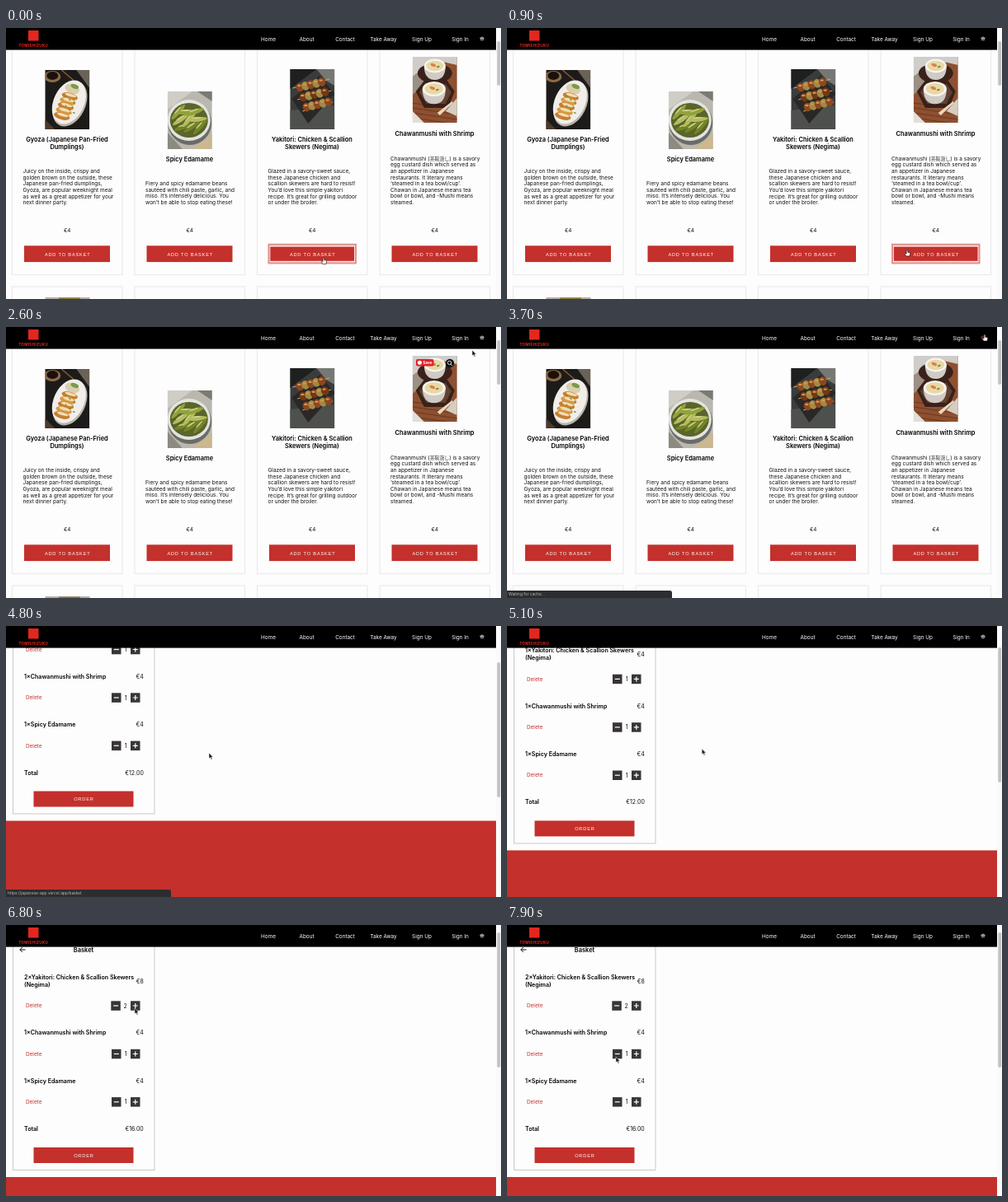
These frames come from a looping animation (600x329 px, 8 s). An HTML page:

```html
<!DOCTYPE html>
<html lang="en">
<head>
<meta charset="utf-8">
<title>Restaurant basket</title>
<style>
html, body { margin: 0; width: 100%; height: 100%; overflow: hidden; background: #fdfdfd; }
svg { display: block; }
#stage { width: 100vw; height: 100vh; }
text { font: 400 6.4px Inter, "Noto Sans CJK JP", "Noto Sans CJK", sans-serif; fill: #111; white-space: pre; }
.nav { fill: #fff; }
.body { font-size: 6.5px; }
.jp { font-size: 5.9px; font-weight: 300; fill: #333; }
.title { font-size: 7.45px; font-weight: 600; fill: #000; }
.item { font-size: 7.1px; font-weight: 600; fill: #000; }
.sum { font-size: 7px; }
.del { fill: #c4302b; }
.btn { font: 400 5.6px "Liberation Sans", Arial, sans-serif; letter-spacing: .85px; fill: #fff; }
.brand { font-size: 4.6px; font-weight: 700; letter-spacing: .3px; fill: #e3271f; }
.stat { font-size: 4.8px; fill: #b9b9b9; }
.save { font-size: 4.8px; font-weight: 700; fill: #fff; }

.on { animation: 8s step-end infinite; }
#shop { animation-name: shop; }
#cart { animation-name: cart; }
#ring2 { animation-name: ring2; }
#ring3 { animation-name: ring3; }
#save { animation-name: save; }
#hot { animation-name: hot; }
#url { animation-name: url; }
#wait { animation-name: wait; }
.one { animation-name: one; }
.two { animation-name: two; }
#hand { animation-name: hand; }
#arrow { animation-name: arrow; }
#page { animation: scroll 8s infinite; }
#thumb { animation: thumb 8s infinite; }
#cursor { animation: cursor 8s infinite; }

@keyframes shop { 0% { visibility: visible } 47.5%, 100% { visibility: hidden } }
@keyframes cart { 0% { visibility: hidden } 47.5%, 100% { visibility: visible } }
@keyframes ring2 { 0% { visibility: visible } 6.5%, 100% { visibility: hidden } }
@keyframes ring3 { 0%, 23.75%, 100% { visibility: hidden } 8.6% { visibility: visible } }
@keyframes save { 0%, 35%, 100% { visibility: hidden } 27.25% { visibility: visible } }
@keyframes hot { 0%, 50%, 100% { visibility: hidden } 35.6% { visibility: visible } }
@keyframes url { 0%, 43.75%, 62.5%, 100% { visibility: hidden } 38.75%, 47.5% { visibility: visible } }
@keyframes wait { 0%, 47.5%, 100% { visibility: hidden } 43.75% { visibility: visible } }
@keyframes one { 0% { visibility: inherit } 82.5%, 100% { visibility: hidden } }
@keyframes two { 0% { visibility: hidden } 82.5%, 100% { visibility: inherit } }
@keyframes hand { 0%, 8.6%, 35.6% { visibility: visible } 6.5%, 23.75%, 50%, 100% { visibility: hidden } }
@keyframes arrow { 0%, 8.6%, 35.6% { visibility: hidden } 6.5%, 23.75%, 50%, 100% { visibility: visible } }
@keyframes scroll { 0%, 61.5% { transform: translateY(-69.5px) } 69%, 100% { transform: none } }
@keyframes thumb { 0%, 61.5% { transform: translateY(35px) } 69%, 100% { transform: none } }
@keyframes cursor {
  0%, 4.5% { transform: translate(385px, 278.5px) }
  9.5% { transform: translate(489px, 272px) }
  11.25%, 18% { transform: translate(485px, 269px); animation-timing-function: ease-in }
  25% { transform: translate(503px, 205px); animation-timing-function: linear }
  28.5% { transform: translate(525px, 100px); animation-timing-function: ease-out }
  32.5% { transform: translate(565px, 28px) }
  37%, 49% { transform: translate(579px, 9px) }
  57% { transform: translate(256px, 149px) }
  60%, 63% { transform: translate(246px, 154px) }
  70%, 72.5% { transform: translate(156px, 107px) }
  76.25%, 90% { transform: translate(156px, 101px); animation-timing-function: ease-in }
  95% { transform: translate(148px, 205px) }
  98.5%, 100% { transform: translate(132px, 160px) }
}
</style>
</head>
<body>
<svg id="stage" viewBox="0 0 600 329"></svg>
<script>
const RED = '#c4302b';
const label = (x, y, s, cls = '', anchor = 'start', size = 6.4) =>
  `<text class="${cls}" x="${x}" y="${y + size * .36}" text-anchor="${anchor}">${s}</text>`;
const mid = (x, y, s, cls, size) => label(x, y, s, cls, 'middle', size);
const box = (x, y, w, h, fill, more = '') =>
  `<rect x="${x}" y="${y}" width="${w}" height="${h}" fill="${fill}" ${more}/>`;
const oval = (x, y, rx, ry, fill, turn = 0) =>
  `<ellipse cx="${x}" cy="${y}" rx="${rx}" ry="${ry}" fill="${fill}" transform="rotate(${turn} ${x} ${y})"/>`;
const path = (d, fill, more = '') => `<path d="${d}" fill="${fill}" ${more}/>`;
const times = (n, f) => Array.from({ length: n }, (_, i) => f(i)).join('');
const photo = (x, y, h, art) =>
  `<svg x="${x}" y="${y}" width="54" height="${h}" viewBox="0 0 54 ${h}">${art}</svg>`;
const show = (id, body) => `<g id="${id}" class="on">${body}</g>`;

// Food pictures, 54 units wide
const gyoza = box(0, 0, 54, 72, '#1d1b1a')
  + path('M38 0H54V22Z', '#6a6257') + oval(9, 8, 10, 7, '#8b6b48') + oval(9, 7, 7, 5, '#1d100b')
  + path('M20 0L34 12', 'none', 'stroke="#8a5a33" stroke-width="1.5"')
  + oval(30, 41, 19, 29, '#b9b5ae', 25) + oval(29, 39, 18.5, 28, '#f1eeea', 25)
  + oval(33, 23, 9, 6, '#d9cfae', 20) + oval(36, 20, 5, 2.6, '#7d9a49', 20)
  + times(5, i => oval(30 - i * 2.4, 32 + i * 6, 10, 4.2, i % 2 ? '#d99a45' : '#c67f30', 16)
    + oval(31 - i * 2.4, 30.5 + i * 6, 7, 1.9, '#f2dcaf', 16))
  + times(6, i => oval(25 + i % 3 * 5, 32 + i * 4, 1.5, .8, '#6e9440', i * 40))
  + path('M0 60L12 72H0Z', '#4b3a2d');
const edamame = box(0, 0, 54, 70, '#b9b7ae')
  + path('M0 0H30L0 22Z', '#cfcdc6') + path('M0 50L18 70H0Z', '#8d8a82') + path('M54 52V70H30Z', '#cbb88f')
  + oval(27, 38, 26.5, 27, '#6b6c69') + oval(26, 35, 26, 25, '#e4e4df') + oval(26, 35, 23, 21, '#59652b')
  + times(9, i => oval(13 + i * 3.3, 34 + (i % 3 - 1) * 9, 12, 2.7,
    ['#93a23c', '#b4bc5c', '#748428'][i % 3], -48 + i % 4 * 14)
    + oval(12 + i * 3.3, 32 + (i % 3 - 1) * 9, 6, .9, '#cfd285', -48 + i % 4 * 14))
  + path('M36 0H54V12Z', '#7b7a72');
const yakitori = box(0, 0, 54, 73, '#3a3c3b')
  + path('M0 0H32L0 24Z', '#1e201f') + path('M32 0H54V20L44 14Z', '#767873')
  + path('M0 50L54 44V73H0Z', '#4d504d') + path('M2 36L36 8L54 30L22 66Z', '#292827')
  + times(3, k => path(`M${3 + k * 6} ${23 + k * 14}L${48 + k * 2} ${12 + k * 14}`, 'none', 'stroke="#cfac74"')
    + times(5, i => oval(12 + k * 4 + i * 6.6, 22 + k * 12 - i * 1.6, 4.6, 5.4,
      i % 2 ? '#a08a45' : k % 2 ? '#733715' : '#8c4720', -20)
      + oval(11 + k * 4 + i * 6.6, 20 + k * 12 - i * 1.6, 2.2, 1.2, '#d9934f')));
const cup = (x, y, r) => path(`M${x - r} ${y}Q${x - r} ${y + r * 1.3} ${x} ${y + r * 1.3}T${x + r} ${y}Z`, '#cfcac3')
  + oval(x, y, r, r * .65, '#f6f4ef') + oval(x, y, r * .8, r * .48, '#e9d8a6')
  + oval(x - 2, y - 1, 3.4, 1.8, '#d9824f', 20) + oval(x + 4, y + 1, 2, 1, '#6f8e43', -20);
const chawan = box(0, 0, 54, 80, '#8d5030')
  + path('M0 0H54V10L28 4L0 24Z', '#cfcdc9') + path('M0 24L14 14V34L0 46Z', '#9c8f84')
  + times(5, i => path(`M0 ${56 + i * 6}L54 ${64 + i * 6}`, 'none', 'stroke="#6a3820"'))
  + oval(27, 20, 21, 12, '#3a221a') + cup(27, 11, 13)
  + path('M4 42L14 29H42L51 42L43 62H14Z', '#38211a') + path('M8 43L16 33H40L47 43L40 57H17Z', '#62402f')
  + cup(26, 39, 14)
  + path('M54 50V72L40 66Z', '#d5cdc2') + path('M30 68L48 54L49 56L33 71Z', '#ead9bd')
  + path('M0 66L14 80H0Z', '#e2dfd9');

const dishes = [
  { title: ['Gyoza (Japanese Pan-Fried', 'Dumplings)'], ty: 135, dy: 174, iy: 51, ih: 72, art: gyoza, text:
    ['Juicy on the inside, crispy and', 'golden brown on the outside, these', 'Japanese pan-fried dumplings,',
      'Gyoza, are popular weeknight meal', 'as well as a great appetizer for your', 'next dinner party.'] },
  { title: ['Spicy Edamame'], ty: 159.5, dy: 189, iy: 77, ih: 70, art: edamame, text:
    ['Fiery and spicy edamame beans', 'sautéed with chili paste, garlic, and', 'miso. It’s intensely delicious. You',
      'won’t be able to stop eating these!'] },
  { title: ['Yakitori: Chicken &amp; Scallion', 'Skewers (Negima)'], ty: 135, dy: 174, iy: 50, ih: 73, art: yakitori, text:
    ['Glazed in a savory-sweet sauce,', 'these Japanese chicken and', 'scallion skewers are hard to resist!',
      'You’d love this simple yakitori', 'recipe. It’s great for grilling outdoor', 'or under the broiler.'] },
  { title: ['Chawanmushi with Shrimp'], ty: 128, dy: 158.6, iy: 35, ih: 80, art: chawan, text:
    ['Chawanmushi (<tspan class="jp">茶碗蒸し</tspan>) is a savory', 'egg custard dish which served as',
      'an appetizer in Japanese', 'restaurants. It literary means', '‘steamed in a tea bowl/cup’.',
      'Chawan in Japanese means tea', 'bowl or bowl, and -Mushi means', 'steamed.'] }
];

const ring = x => box(x - 1.5, 261.8, 107.5, 24.6, '#f8e3e1')
  + box(x - .5, 262.8, 105.5, 22.6, 'none', 'stroke="#df928d" stroke-width="2"')
  + box(x + 1.4, 265.6, 101.6, 17.2, RED);

function card(d, i) {
  const x = 7.5 + i * 148.5, c = x + 66.5, bx = x + 14.5;
  const frame = 'stroke="#ebebeb" stroke-width="1.2"';
  return box(x, 10, 133.5, 289.5, '#fdfdfd', frame) + box(x, 314, 133.5, 60, '#fdfdfd', frame)
    + photo(c - 26.7, d.iy, d.ih, d.art)
    + d.title.map((s, n) => mid(c, d.ty + n * 9.5, s, 'title', 7.4)).join('')
    + d.text.map((s, n) => label(x + 13, d.dy + n * 7.55, s, 'body')).join('')
    + mid(c + .3, 245.5, '€4')
    + box(bx, 264.3, 104, 19.8, RED)
    + (i > 1 ? show('ring' + i, ring(bx)) : '')
    + mid(c + .7, 274.5, 'ADD TO BASKET', 'btn', 5.6);
}

const saveTag = box(497, 39, 21.5, 8.6, '#e0202b', 'rx="2"') + oval(501.4, 43.3, 2.5, 2.5, '#fff')
  + label(505.2, 43.3, 'Save', 'save', 'start', 4.8)
  + oval(538, 44, 5.2, 5.2, '#111')
  + path('M539.2 45.2L541 47M539.8 43.4A2.2 2.2 0 1 1 535.4 43.4A2.2 2.2 0 1 1 539.8 43.4', 'none', 'stroke="#fff" stroke-width=".8"');

const shop = box(0, 0, 594, 329, '#fdfdfd') + dishes.map(card).join('')
  + box(47.5, 327, 54, 2, '#b4b1a8') + box(64, 327.4, 26, 1.6, '#8a7b3a')
  + show('save', saveTag) + box(595.3, 16, 3.8, 54, '#c2c2c2', 'rx="1.9"');

const stepper = (y, n, x) => box(x, y - 5.7, 11.5, 11.5, '#393536')
  + path(`M${x + 2.8} ${y}h6`, 'none', 'stroke="#fff" stroke-width="1.2"') + mid(x + 17.3, y, n, 'sum', 7);
const plus = y => box(151, y - 5.7, 11.5, 11.5, '#393536')
  + path(`M153.8 ${y}h6M156.8 ${y - 3}v6`, 'none', 'stroke="#fff" stroke-width="1.2"');
const price = (y, s) => label(166.8, y, s, 'sum', 'end', 7);
const row = (y, name) => label(22, y, '1×' + name, 'item', 'start', 7.1) + price(y, '€4')
  + label(24, y + 25.8, 'Delete', 'del') + stepper(y + 25.8, 1, 128) + plus(y + 25.8);
const swap = (a, b) => `<g class="on one">${a}</g><g class="on two">${b}</g>`;
const first = n => label(22, 63.5, n + '×Yakitori: Chicken &amp; Scallion Skewers', 'item', 'start', 7.1)
  + price(68.3, '€' + n * 4) + stepper(98, n, n > 1 ? 127.3 : 128) + price(247.5, `€${8 + n * 4}.00`);

const cart = box(0, 0, 594, 329, '#fdfdfd') + `<g id="page">`
  + box(8.5, 14, 171.5, 283.5, '#fdfdfd', 'stroke="#c9c9c9"')
  + path('M23.5 30H16.8M19.8 27L16.8 30L19.8 33', 'none', 'stroke="#111" stroke-width="1"')
  + mid(94, 30.5, 'Basket', 'title', 7.4)
  + swap(first(1), first(2)) + label(22, 72.3, '(Negima)', 'item', 'start', 7.1)
  + label(24, 98, 'Delete', 'del') + plus(98)
  + row(130.7, 'Chawanmushi with Shrimp') + row(189, 'Spicy Edamame')
  + label(22, 247.5, 'Total', 'item', 'start', 7.1)
  + box(33.5, 270, 121, 19, RED) + mid(94.4, 279.5, 'ORDER', 'btn', 5.6)
  + box(0, 306, 594, 200, RED) + '</g>'
  + box(594, 0, 6, 329, '#fafafa') + box(595.3, 9, 3.8, 164, '#c2c2c2', 'rx="1.9" id="thumb"');

const bag = c => path('M574.8 12.2H579.2L578.6 15.2H575.4Z', c, 'fill-opacity=".65"')
  + path('M575.6 12.2A1.5 2 0 0 1 578.4 12.2M574.2 12.2H579.8', 'none', `stroke="${c}" stroke-width=".6"`)
  + path('M576.3 12.8V14.8M577.7 12.8V14.8', 'none', 'stroke="#000" stroke-width=".5"');
const links = ['Home', 'About', 'Contact', 'Take Away', 'Sign Up', 'Sign In'];
const header = box(0, 0, 594, 26.6, '#000') + box(27, 3, 12.5, 12.5, '#e3271f')
  + mid(33.2, 21, 'TOMISHIZUKU', 'brand', 4.6)
  + links.map((s, i) => mid(318 + i * 46.5, 13.6, s, 'nav')).join('')
  + bag('#fff') + show('hot', box(573.5, 9, 7, 8, '#000') + bag('#d8322b'));

const status = (id, s) => show(id, path('M0 320H197.5Q200 320 200 322.5V329H0Z', '#2d2d2f')
  + label(2, 324.7, s, 'stat', 'start', 4.8));

const pointer = show('hand', path('M-.9 .6Q0 -.6 .8 .6V3.2L3 3.6Q4 4 3.7 5.4L3 8H-1.2L-3 5.2Q-2.8 4.2 -.9 5Z',
    '#fff', 'stroke="#111" stroke-width=".7"'))
  + show('arrow', path('M0 0V7L1.6 5.6L2.7 8.2L3.9 7.7L2.8 5.2H4.9Z', '#111', 'stroke="#fff" stroke-width=".5"'));

document.getElementById('stage').innerHTML = box(0, 0, 600, 329, '#fafafa')
  + show('shop', shop) + show('cart', cart) + header
  + status('url', 'https://japanese-app.vercel.app/basket') + status('wait', 'Waiting for cache…')
  + `<g id="cursor">${pointer}</g>`;
</script>
</body>
</html>
```
